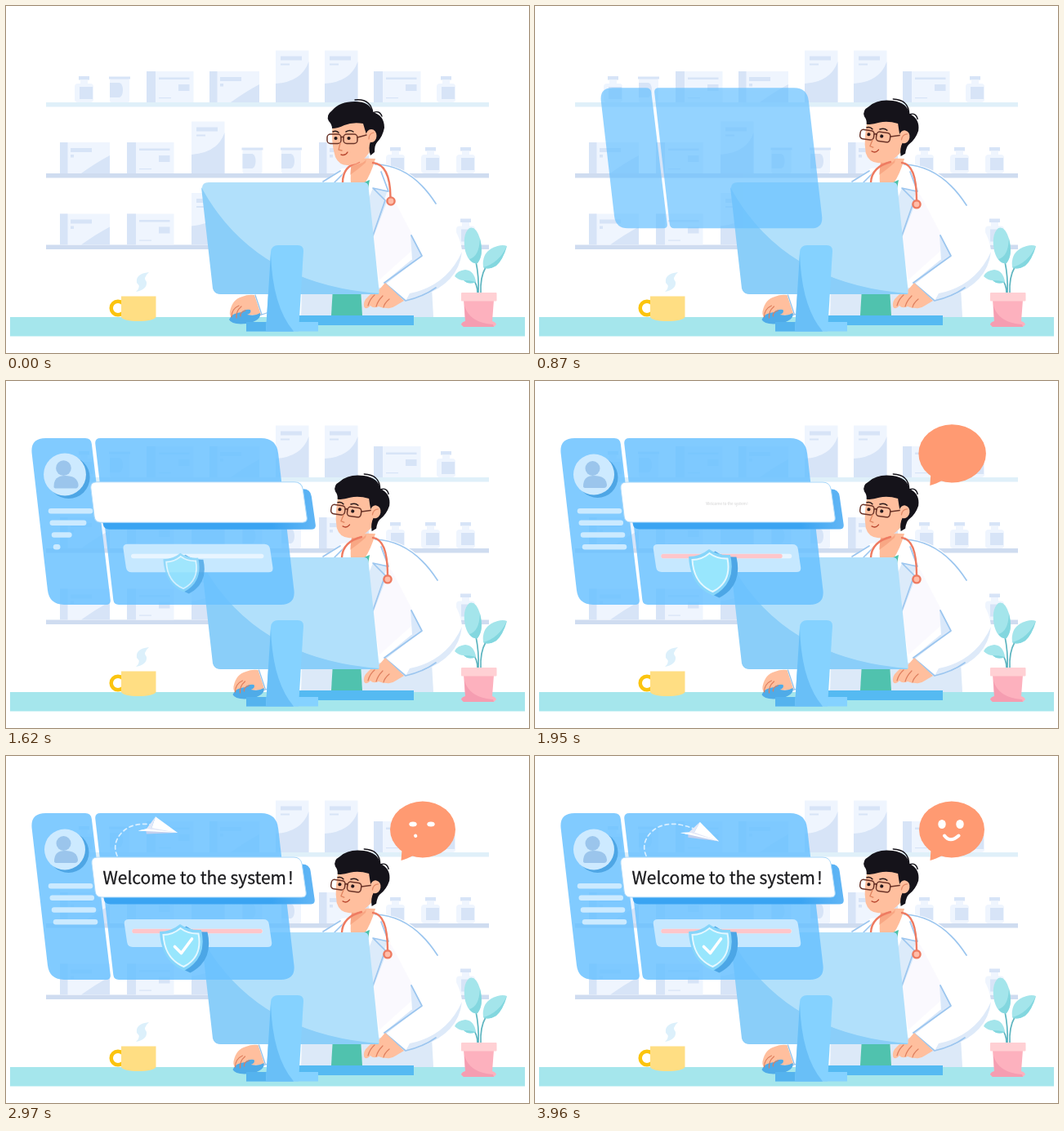
Animation of 640x425 px, one loop 4500 ms. Source, as an HTML page:

```html
<!DOCTYPE html>
<html lang="en">
<head>
<meta charset="utf-8">
<title>Pharmacist at work</title>
<style>
html, body { margin: 0; width: 100%; height: 100%; overflow: hidden; background: #fff; }
svg { display: block; width: 100vw; height: 100vh; }
text { font: 500 20.9px "Noto Sans CJK SC", "Noto Sans CJK JP", "Noto Sans CJK", "Noto Sans", sans-serif; }
.line { fill: none; stroke-linecap: round; stroke-linejoin: round; }
</style>
</head>
<body>
<svg viewBox="0 0 640 425">
  <defs>
    <linearGradient id="bannerSide"><stop stop-color="#3aa4f2"/><stop offset=".8" stop-color="#3aa4f2"/><stop offset="1" stop-color="#62b6f5"/></linearGradient>
    <path id="flight" d="M158 148C134 128 128 112 139 97C149 84 164 82 177 84C187 86 195 89 203 93"/>
    <mask id="trailMask" maskUnits="userSpaceOnUse" x="0" y="0" width="640" height="425">
      <use id="trailReveal" href="#flight" fill="none" stroke="#fff" stroke-width="6"/>
    </mask>
  </defs>

  <g id="shelves"></g>

  <g id="body">
    <path d="M378 222L411 199L452 193Q500 194 527 243Q558 279 558 302Q550 348 489 361L462 381H362V340Z" fill="#fff"/>
    <path d="M362 345H521L523 381H361Z" fill="#dce9f8"/>
    <path d="M464 338L498 283L558 302Q550 348 489 361Z" fill="#fff"/>
    <path d="M400 345H434L436 379H398Z" fill="#50c2ae"/>
    <path d="M558 301Q553 347 489 361L494 352Q539 343 558 301Z" fill="#deeaf9"/>
    <path d="M455 222L472 232L497 280L496 300L457 335L440 240Z" fill="#faf9fe"/>
    <path d="M449 223L467 226L463 237L466 240L447 290L440 245Z" fill="#dcebfa"/>
    <path d="M495 280L509 306L497 311Z" fill="#d9e8fa"/>
    <path d="M462 339L496 311L509 306L464 341Z" fill="#d9e8fa"/>
    <g class="line" stroke="#9cc6ef" stroke-width="1.7">
      <path d="M388 215L409 202M402 216L413 205"/>
      <path d="M467 227L449 223L464 238L449 281"/>
      <path d="M496 281L509 306L463 339L489 361Q511 356 526 345"/>
      <path d="M459 203L468 227"/>
      <path id="shoulder"/>
    </g>
    <path d="M423 186L452 187Q447 205 439 217H420Q423 204 423 186Z" fill="#ffbd9b"/>
    <path d="M423 191Q433 197 441 188L440 192Q431 200 421 207Z" fill="#f8a784"/>
    <path d="M436 217L445 213L443 224Z" fill="#4ac0a8"/>
    <path d="M412 205L421 199L422 217H408Z" fill="#fff"/>
    <g class="line" stroke="#ee7b61" stroke-width="2.4">
      <path id="tubeLeft"/><path id="tubeRight"/>
      <circle id="bell" r="4.6" fill="#ffbda9"/>
    </g>
  </g>

  <g id="head">
    <path d="M400 142Q397 166 403 185Q408 196 420 195Q436 193 445 179L451 150L440 135Z" fill="#ffbf9e"/>
    <path d="M395 141Q391 134 399 128Q408 117 427 117Q445 117 449 130Q463 134 463 149Q461 160 454 167Q451 170 451 179L446 183Q443 174 446 166L441 157Q439 151 437 144Q424 142 414 146Q406 150 399 150Q399 145 395 141Z" fill="#15131a"/>
    <path class="line" d="M427 115Q446 113 449 131Q457 127 460 135" stroke="#15131a" stroke-width="1.4"/>
    <ellipse cx="447" cy="159" rx="6.5" ry="8" fill="#ffbf9e"/>
    <path class="line" d="M444 163Q444 156 450 155" stroke="#e28b68" stroke-width="1.2"/>
    <g class="line" stroke="#6a3428" stroke-width="1.5">
      <rect x="393" y="157" width="17" height="11.5" rx="4"/>
      <rect x="413" y="157" width="17" height="11.5" rx="4"/>
      <path d="M410 161Q411.500 159.500 413 161M430 161L441 158"/>
      <path d="M400 154Q404 152 407 155M416 154Q421 151 425 154" stroke="#2a1b1c"/>
    </g>
    <circle cx="403.500" cy="162" r="2.1" fill="#251a1e"/><circle cx="419.500" cy="162" r="2.1" fill="#251a1e"/>
    <path class="line" d="M409 168L407 176L411 177" stroke="#e08661" stroke-width="1.3"/>
    <path class="line" d="M410 182Q415 184 418 179" stroke="#b9472f" stroke-width="1.4"/>
  </g>

  <rect x="5" y="381" width="630" height="23.500" fill="#a5e6ec"/>
  <rect x="357" y="379" width="142" height="12" fill="#55baf2"/>
  <path d="M464 339L487 361L477 367Q472 371 466 370Q460 370 456 368Q449 371 446 367Q440 373 438 368Q437 361 443 356Q450 348 457 347Z" fill="#ffbf9e"/>
  <path class="line" d="M451 354Q445 359 443 367M461 355Q455 361 453 368M469 359Q463 364 462 369" stroke="#de7e5e" stroke-width="1.2"/>

  <g id="mouseHand">
    <path d="M306 354L313 379L324 374V354Z" fill="#fff"/>
    <path class="line" d="M305 354L313 378M310 379L322 375" stroke="#8fc3ef" stroke-width="1.3"/>
    <path d="M304 354L312 378L296 379Q289 385 278 383Q273 380 274 374Q277 359 289 356Q296 353 304 354Z" fill="#ffbf9e"/>
    <path d="M273 384Q276 376 288 375Q292 371 299 372Q301 376 295 378Q305 380 311 376Q313 385 295 389Q276 391 273 384Z" fill="#4fabe8"/>
    <path class="line" d="M285 367Q276 371 276 381M288 368Q281 374 282 382M293 373Q286 375 287 380" stroke="#de7e5e" stroke-width="1.2"/>
  </g>

  <path id="screen" fill="#b1e0fb"/>
  <path d="M239 222Q304 341 457 352L455 353H263Q255 353 253 346Z" fill="#8acef9"/>
  <path d="M294 387H382V398.500H294Z" fill="#85d2ff"/>
  <path d="M294 387H330L352 398.500H294Z" fill="#55b3ee"/>
  <path d="M333 293H357Q364 293 364 300L358 398.500H318L324 301Q325 293 333 293Z" fill="#85d2ff"/>
  <path d="M324 303Q326 368 352 398.500H318Z" fill="#69bff7"/>

  <circle cx="137" cy="370" r="8.300" fill="none" stroke="#fbc40f" stroke-width="4.500"/>
  <path d="M141 355.500H183.500V381Q180 386 162 386Q144 386 141 381Z" fill="#ffde83"/>
  <path d="M175 326Q158 328 160 339Q166 344 159 350Q173 347 172 338Q167 333 175 326Z" fill="#dcf0fb"/>

  <path class="line" d="M575 313Q579 332 578 352M587 320Q580 332 581 352M571 335Q577 340 577 352" stroke="#5eb5c0" stroke-width="1.7"/>
  <g fill="#a4e5eb">
    <path id="leaf" d="M567 272Q575 269 580 285Q585 305 577 315Q567 317 562 300Q558 280 567 272Z"/>
    <path d="M613 294Q608 311 600 318Q590 324 584 320Q582 304 594 297Q606 291 613 294Z"/>
    <path d="M549 331Q552 324 562 323Q573 324 575 338Q566 342 560 336Q554 336 549 331Z"/>
  </g>
  <g fill="#83d7df">
    <path d="M580 285Q585 305 577 315Q571 316 567 310Q579 307 580 285Z"/>
    <path d="M613 294Q608 311 600 318Q590 324 584 320Q603 315 613 294Z"/>
    <path d="M560 336Q568 336 575 338Q566 342 560 336Z"/>
  </g>
  <path d="M560 360H597L595 386Q599 387 600 390L597 393H560L557 390Q558 387 562 386Z" fill="#fdb1be"/>
  <path d="M561 367Q567 388 596 390L597 393H560L557 390Q558 387 562 386Z" fill="#f59db1"/>
  <rect x="557" y="351" width="43.500" height="10.500" rx="1" fill="#ffd0d4"/>

  <g id="windows" fill="#69c1ff" fill-opacity=".84"><path id="sidePanel"/><path id="mainPanel"/></g>

  <g id="avatar">
    <circle cx="76.500" cy="118" r="25" fill="#4ea6e5"/>
    <circle cx="72" cy="114.500" r="25" fill="#cdeaff"/>
    <circle cx="70.500" cy="107" r="9" fill="#9bc5ec"/>
    <path d="M59 129Q59 116 72 116Q87 116 88 127Q88 131 84 131H62Q59 131 59 129Z" fill="#9bc5ec"/>
  </g>
  <g id="menu" class="line" stroke="#cbeaff" stroke-width="6.500"></g>

  <use href="#flight" mask="url(#trailMask)" class="line" stroke="#d9efff" stroke-width="1.700" stroke-dasharray="4.500 4"/>
  <g id="plane">
    <path d="M25 .5L-22 12L-7 4L-6.500 -10.500Z" fill="#fff"/>
    <path d="M25 .5L-7 4L-6.500 -10.500L-10 -1L-13 7Z" fill="#e3e8f7"/>
    <path d="M25 .5L-11 13L-13 9Z" fill="#c3d0ee"/>
    <path d="M25 .5L-22 12L-13 7Z" fill="#fff"/>
  </g>

  <g id="card">
    <path id="cardShape" fill="#c6e8ff"/>
    <path id="track" class="line" d="M157 214.500H311.500" stroke="#e8f5ff" stroke-width="5.500"/>
    <path id="bar" class="line" stroke="#ffc6ca" stroke-width="5.500"/>
  </g>
  <g id="banner">
    <path id="bannerShadow" fill="url(#bannerSide)"/>
    <path id="bannerFace" fill="#fff" stroke="#a9d8fa"/>
  </g>
  <g id="shield">
    <path id="crest" d="M213 206Q224 214 239 213Q247 248 218 263Q190 252 188 215Q202 215 213 206Z" fill="#4ca6e6" transform="translate(7.500 2.500)"/>
    <use href="#crest" transform="translate(-7.500 -2.500)" style="display:none"/>
    <path d="M213 206Q224 214 239 213Q247 248 218 263Q190 252 188 215Q202 215 213 206Z" fill="#86d5fa"/>
    <path d="M213.500 211Q223 218 235.500 217.500Q241 246 217.500 258Q194 248 192.500 219Q204 219 213.500 211Z" fill="#98e6fd" stroke="#e4f8ff" stroke-width="2"/>
  </g>
  <path id="check" class="line" d="M206.500 233.500L214.500 241.500L227.500 224" stroke="#fff" stroke-width="3.600" pathLength="1" stroke-dasharray="1 2"/>
  <text id="greeting" x="118.500" y="157" fill="#1c1c1f" stroke="#1c1c1f" stroke-width=".3">Welcome to the system<tspan dx="2">!</tspan></text>

  <g id="bubble">
    <path d="M485 108L483.500 128Q491 126 500 121Z" fill="#ff9a72"/>
    <ellipse cx="510" cy="90" rx="40" ry="34.500" fill="#ff9a72"/>
  </g>
  <g id="eyes" fill="#fff"><ellipse cx="498" cy="83.500" rx="4.700"/><ellipse cx="520" cy="83.500" rx="4.700"/></g>
  <path id="smile" class="line" d="M501 97.500Q508 107 518.500 97.500" stroke="#fff" stroke-width="4" pathLength="1" stroke-dasharray="1 2"/>
</svg>

<script>
const LOOP = 4500;
const $ = id => document.getElementById(id);
const set = (id, attrs) => { for (const k in attrs) $(id).setAttribute(k, attrs[k]); };
const progress = (t, a, b) => Math.min(1, Math.max(0, (t - a) / (b - a)));
const smooth = u => u * u * (3 - 2 * u);

// Polygon path with rounded corners; each point is [x, y, radius].
function rounded(points) {
  const n = points.length;
  const toward = ([x, y, r], [u, v]) => {
    const k = r / Math.hypot(u - x, v - y);
    return `${x + (u - x) * k} ${y + (v - y) * k}`;
  };
  return points.map((p, i) =>
    `${i ? 'L' : 'M'}${toward(p, points[(i + n - 1) % n])}Q${p[0]} ${p[1]} ${toward(p, points[(i + 1) % n])}`
  ).join('') + 'Z';
}

const PALE = '#eff5fe', DUSK = '#d7e4f7';
const rect = (x, y, w, h, fill = DUSK, rx = 0) =>
  `<rect x="${x}" y="${y}" width="${w}" height="${h}" rx="${rx}" fill="${fill}"/>`;
const shape = (d, fill = DUSK) => `<path d="${d}" fill="${fill}"/>`;

// Goods are drawn upwards from the shelf line at y = 0.
const goods = {
  bottle: rect(5, -32, 13, 4.5) + rect(7, -27.5, 9, 6, PALE) + rect(0, -23, 23, 23, PALE, 4) + rect(6, -19, 16, 15),
  jar: rect(1, -29, 24, 29, PALE, 2) + rect(0, -31.5, 26, 3) + shape('M1 -24H13Q17 -22 17 -15Q17 -8 13 -6H1Z'),
  pack: rect(0, -38, 57.5, 38, PALE) + rect(0, -38, 11, 38) + rect(15, -30.5, 37.5, 2.5) + rect(39, -22, 13.5, 8) + rect(15, -6, 15, 1.2),
  box: rect(0, -38, 61, 38, PALE) + rect(0, -38, 9.5, 38) + rect(13, -31, 26, 5) + rect(13, -23, 4, 3.5) + shape('M26 0Q44 -13 61 -22V0Z'),
  carton: rect(0, -63.5, 40.5, 63.5, PALE) + rect(6, -56.5, 26, 5) + rect(6, -47.5, 11, 2) + shape('M0 -23Q32 -25 40.5 -50V0H0Z')
};
const shelves = [
  [118, '#dff0f9', { bottle: [84, 527], jar: [126], pack: [172, 450], box: [249], carton: [330, 390] }],
  [205, '#cfdcf0', { bottle: [465, 508, 551], jar: [288.5, 336], pack: [148], box: [66, 383], carton: [227] }],
  [292.5, '#cfdcf0', { bottle: [551], pack: [148], box: [66], carton: [227] }]
];
$('shelves').innerHTML = shelves.map(([y, color, stock]) =>
  rect(49, y, 542, 5.5, color) + Object.entries(stock).map(([kind, xs]) =>
    xs.map(x => `<g transform="translate(${x} ${y})">${goods[kind]}</g>`).join('')).join('')).join('');

const bannerCorners = [[104, 124, 8], [361, 124, 9], [368, 173, 6], [110, 173, 7]];
const outlines = {
  screen: [[239, 216, 9], [443, 216, 5], [457, 353, 3], [255, 353, 10]],
  sidePanel: [[29.5, 70, 19], [104, 70, 7], [128.5, 274, 6], [53, 274, 18]],
  mainPanel: [[108.5, 70, 7], [331, 70, 19], [354.5, 274, 18], [132, 274, 6]],
  cardShape: [[144, 200, 6], [321, 200, 6], [326, 234, 6], [149, 234, 6]],
  bannerFace: bannerCorners,
  bannerShadow: bannerCorners.map(([x, y, r]) => [x + 10.5, y + 8.5, r])
};
for (const id in outlines) set(id, { d: rounded(outlines[id]) });

const menuLines = [[55, 159.3], [56.8, 173.8], [59, 188.5], [61, 203.2]];
$('menu').innerHTML = menuLines.map((_, i) => `<path id="item${i}"/>`).join('');

// Fade and grow past full size until b, then settle until c.
function pop(id, t, [a, b, c], [x, y], peak = 1.04, tilt = 0) {
  const u = progress(t, a, b);
  const s = u < 1 ? peak * u * (2 - u) : peak + (1 - peak) * smooth(progress(t, b, c));
  const angle = Math.max(0, s - 1) * tilt;
  set(id, {
    opacity: Math.min(1, u * 1.5),
    transform: `translate(${x} ${y}) rotate(${angle}) scale(${s}) translate(${-x} ${-y})`
  });
}

function stroke(id, u) {
  set(id, { 'stroke-dashoffset': 1 - u, visibility: u > 0 ? 'visible' : 'hidden' });
}

function drawDoctor(t) {
  const k = smooth(progress(t, 0, 660));
  set('head', { transform: `rotate(${8 * k} 440 195)` });
  set('mouseHand', { transform: `translate(${4.5 * smooth(progress(t, 0, 540))} 0)` });
  set('shoulder', { d: `M452 194Q${496 + k} ${195 + k} ${526 + 2 * k} ${242 + 2 * k}` });
  set('tubeLeft', { d: `M${432 + 3 * k} 191Q412 ${196 + k} ${412 - k} 216` });
  set('tubeRight', { d: `M449 192Q${470 - 3 * k} 194 ${470.5 - 3.5 * k} ${234 + 4 * k}` });
  set('bell', { cx: 471 - 4 * k, cy: 239 + 3.8 * k });
}

function drawWindows(t) {
  pop('windows', t, [600, 1080, 1350], [344, 263]);
  pop('avatar', t, [1290, 1590, 1800], [72, 115]);
  pop('banner', t, [1270, 1540, 1710], [240, 152], 1.015);
  pop('card', t, [1380, 1640, 1800], [235, 217], 1.02);
  pop('shield', t, [1480, 1740, 1900], [215, 235], 1.06);
  menuLines.forEach(([x, y], i) => {
    const u = smooth(progress(t, 1380 + 70 * i, 1620 + 70 * i));
    set(`item${i}`, { d: `M${x} ${y}h${48 * u + .01}`, visibility: u > 0 ? 'visible' : 'hidden' });
  });
  const fill = smooth(progress(t, 1650, 2010));
  set('bar', { d: `M157 214.500h${154 * fill + .01}`, visibility: fill > 0 ? 'visible' : 'hidden' });
  pop('greeting', t, [1905, 2310, 2580], [235, 150], 1.03, 50);
  stroke('check', smooth(progress(t, 2040, 2340)));
}

const flight = $('flight');
const flightLength = flight.getTotalLength();

function drawPlane(t) {
  const u = 1 - (1 - progress(t, 2720, 3240)) ** 3;
  const at = u * flightLength;
  const p = flight.getPointAtLength(at);
  const from = flight.getPointAtLength(Math.max(0, at - 2));
  const to = flight.getPointAtLength(Math.min(flightLength, at + 2));
  const angle = Math.atan2(to.y - from.y, to.x - from.x) * 180 / Math.PI;
  set('plane', {
    transform: `translate(${p.x} ${p.y}) rotate(${angle})`,
    opacity: progress(t, 2720, 2800)
  });
  set('trailReveal', { 'stroke-dasharray': `${Math.max(0, at - 8)} 999` });
}

function drawBubble(t) {
  pop('bubble', t, [1640, 1990, 2300], [490, 126], 1.045);
  const open = .55 + .45 * Math.cos((Math.min(t, 3960) - 3960) / 566 * 2 * Math.PI);
  for (const eye of $('eyes').children) eye.setAttribute('ry', 5.6 * open);
  set('eyes', { opacity: progress(t, 2720, 2860) });
  stroke('smile', smooth(progress(t, 2945, 3235)));
}

function frame() {
  const t = performance.now() % LOOP;
  drawDoctor(t);
  drawWindows(t);
  drawPlane(t);
  drawBubble(t);
  requestAnimationFrame(frame);
}
frame();
</script>
</body>
</html>
```
